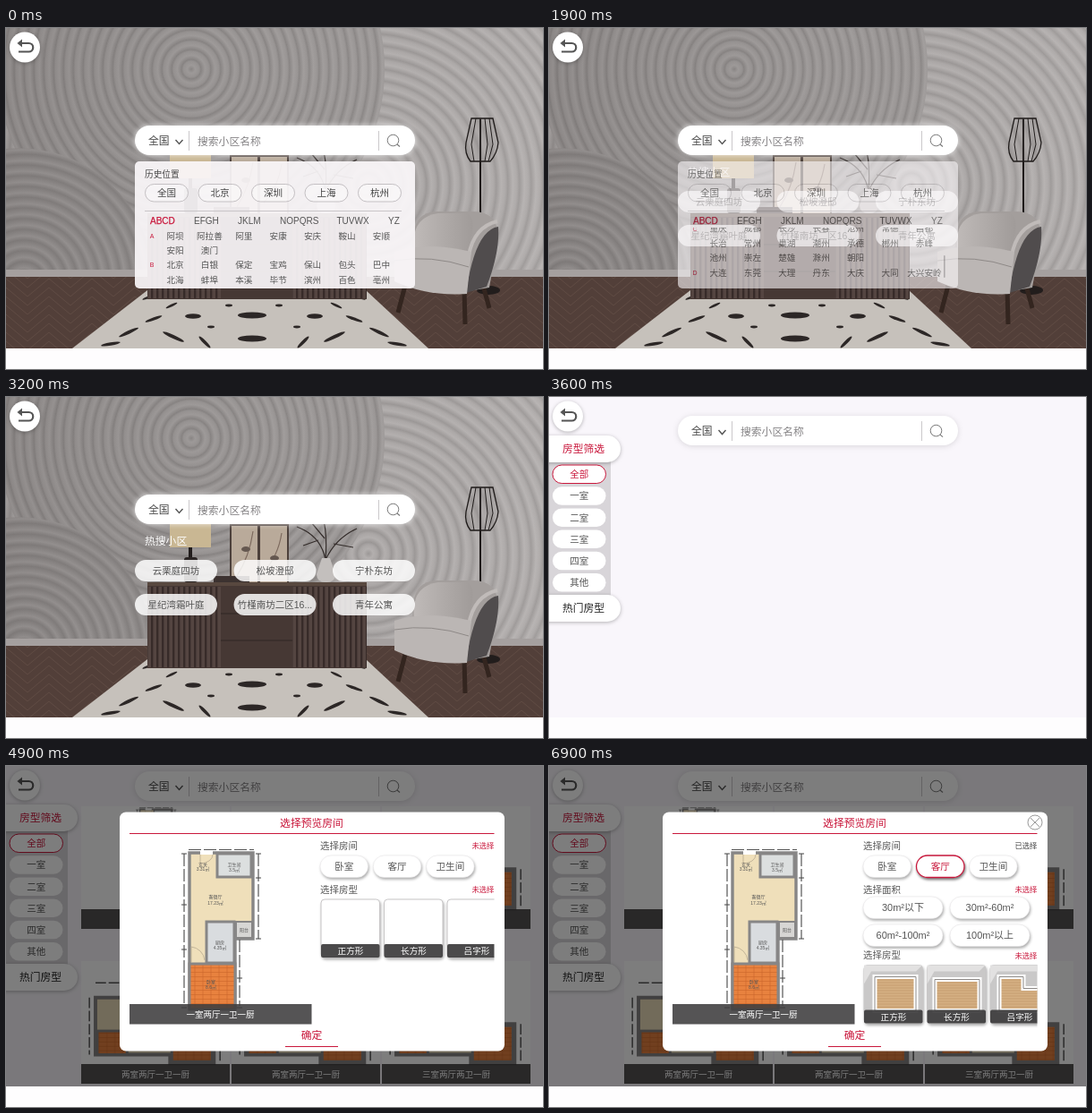
Animation of 600 by 381 pixels, one loop 7000 ms. Source, as an HTML page:

```html
<!DOCTYPE html>
<html lang="zh">
<head>
<meta charset="utf-8">
<style>
  html, body { margin: 0; width: 100%; height: 100%; overflow: hidden; background: #fefdfe; }
  svg { display: block; width: 100%; height: 100%; }
  text { font-family: "Liberation Sans", "Noto Sans CJK SC", "Noto Sans CJK", sans-serif; }
  .soft { filter: drop-shadow(0 1px 2px rgba(0,0,0,.28)); }
  .lift { filter: drop-shadow(1px 2px 1.5px rgba(0,0,0,.32)); }
</style>
</head>
<body>
<svg id="stage" viewBox="0 0 600 381">
  <defs>
    <radialGradient id="ringA" gradientUnits="userSpaceOnUse" cx="207" cy="46" r="11" spreadMethod="repeat">
      <stop offset="0" stop-color="#8d8988"/><stop offset=".4" stop-color="#a39f9e"/>
      <stop offset=".8" stop-color="#9b9796"/><stop offset="1" stop-color="#8a8685"/>
    </radialGradient>
    <radialGradient id="ringB" gradientUnits="userSpaceOnUse" cx="405" cy="175" r="13" spreadMethod="repeat">
      <stop offset="0" stop-color="#9c9897"/><stop offset=".4" stop-color="#b4b0af"/>
      <stop offset=".75" stop-color="#aba7a6"/><stop offset="1" stop-color="#9a9695"/>
    </radialGradient>
    <radialGradient id="ringC" gradientUnits="userSpaceOnUse" cx="20" cy="285" r="12" spreadMethod="repeat">
      <stop offset="0" stop-color="#8a8685"/><stop offset=".4" stop-color="#a09c9b"/><stop offset="1" stop-color="#8a8685"/>
    </radialGradient>
    <linearGradient id="shade">
      <stop offset="0" stop-color="#3a3433" stop-opacity=".16"/><stop offset=".5" stop-color="#555" stop-opacity=".03"/>
      <stop offset="1" stop-color="#fff" stop-opacity=".06"/>
    </linearGradient>
    <linearGradient id="seat"><stop offset="0" stop-color="#bfbab8"/><stop offset="1" stop-color="#a09b99"/></linearGradient>
    <pattern id="parquet" width="48" height="20" patternUnits="userSpaceOnUse">
      <rect width="48" height="20" fill="#523f39"/>
      <path d="M0 0L24 20L48 0M0 10L12 20M48 10L36 20M12 0L24 10L36 0" fill="none" stroke="#5f4b43"/>
    </pattern>
    <pattern id="slats" width="6" height="8" patternUnits="userSpaceOnUse">
      <rect width="6" height="8" fill="#544541"/><rect width="2.4" height="8" fill="#372b29"/>
    </pattern>
    <pattern id="wood" width="8" height="3" patternUnits="userSpaceOnUse">
      <rect width="8" height="3" fill="#d5b083"/><path d="M0 .5H8" stroke="#b98f5f" stroke-width=".6"/>
    </pattern>
    <pattern id="boards" width="9" height="5" patternUnits="userSpaceOnUse">
      <rect width="9" height="5" fill="#e8823f"/><path d="M0 .5H9M4 0V5" stroke="#c9652a" stroke-width=".6"/>
    </pattern>
    <clipPath id="photoClip"><rect width="600" height="358"/></clipPath>
    <clipPath id="listClip"><rect x="150" y="223" width="300" height="64"/></clipPath>
    <clipPath id="roomClip"><rect x="346" y="75" width="199.5" height="220"/></clipPath>
  </defs>
</svg>
<script>
const stage = document.getElementById('stage');
const RED = '#c9183c', DARK = '#444';

function add(parent, tag, attrs = {}, content) {
  const node = document.createElementNS('http://www.w3.org/2000/svg', tag);
  for (const key in attrs) node.setAttribute(key, attrs[key]);
  if (content) node.textContent = content;
  parent.appendChild(node);
  return node;
}
const group = (parent, attrs) => add(parent, 'g', attrs);
const box = (parent, x, y, width, height, fill, extra) =>
  add(parent, 'rect', { x, y, width, height, fill, ...extra });
const path = (parent, d, stroke, width = 1, fill = 'none') =>
  add(parent, 'path', { d, stroke, 'stroke-width': width, fill });
const oval = (parent, cx, cy, rx, ry, fill, extra) =>
  add(parent, 'ellipse', { cx, cy, rx, ry, fill, ...extra });
// Text is placed by its vertical middle.
const label = (parent, x, y, size, fill, content, anchor = 'middle') =>
  add(parent, 'text', { x, y: y + size * .37, 'font-size': size, fill, 'text-anchor': anchor }, content);
function pill(parent, x, y, w, h, content, size, color = '#555', extra = {}) {
  box(parent, x, y, w, h, '#fff', { rx: h / 2, ...extra });
  label(parent, x + w / 2, y + h / 2, size, color, content);
}

// Living room
const room = group(stage, { 'clip-path': 'url(#photoClip)' });
box(room, 0, 0, 600, 358, 'url(#ringB)');
oval(room, 207, 46, 216, 216, 'url(#ringA)');
path(room, 'M0 135A150 150 0 0 1 165 285H0Z', 'none', 0, 'url(#ringC)');
box(room, 0, 0, 600, 358, 'url(#shade)');
box(room, 0, 270, 600, 8, '#a5a09f');
box(room, 0, 278, 600, 80, 'url(#parquet)');
path(room, 'M158 293H402L472 358H74Z', 'none', 0, '#c6c1bb');
for (const side of [-1, 1]) {
  const rug = group(room, { transform: `translate(277 0) scale(${side} 1)` });
  for (const [x, y, rx, ry, turn] of [
    [68, 322, 9, 2.8, 0], [28, 310, 4, 1.4, 0], [48, 334, 4, 1.4, 0], [92, 310, 7, 1.4, 25],
    [112, 325, 10, 1.6, 20], [90, 345, 13, 2, -25], [140, 340, 12, 1.8, 25], [55, 351, 9, 1.8, -45],
    [160, 353, 11, 1.8, 10], [118, 301, 7, 1.4, 20]
  ]) oval(rug, x, y, rx, ry, '#2c2726', { transform: `rotate(${turn} ${x} ${y})` });
}
oval(room, 275, 321, 16, 3.4, '#2c2726');
oval(room, 275, 347, 16, 3.6, '#2c2726');

// Pictures, table lamp, vase and cabinet
box(room, 250, 142, 66, 66, '#4c403b');
box(room, 252, 144, 29, 63, '#b9aa9a');
box(room, 284, 144, 30, 63, '#b9aa9a');
path(room, 'M258 200Q272 178 276 150M288 195Q304 178 308 152', '#7d6a5e', 1.2);
oval(room, 268, 170, 5, 3, '#655850');
oval(room, 300, 180, 5, 3, '#655850');
path(room, 'M183 142H229V168H183Z', 'none', 0, '#c9b793');
path(room, 'M206 168V180', '#211c1b', 4);
box(room, 199, 179, 15, 28, '#2b2524', { rx: 3 });
box(room, 232, 200, 40, 7, '#3c3230');
path(room, 'M357 182Q352 155 325 145M357 182Q359 155 355 138M357 182Q368 158 392 147M349 160L332 166M366 164L388 168M356 158L341 140',
  '#332c2a', 1.2);
path(room, 'M353 180H362L368 198Q368 207 358 207Q347 207 347 198Z', 'none', 0, '#c3bfbd');
box(room, 158, 207, 245, 96, '#463834');
box(room, 158, 212, 82, 90, 'url(#slats)');
box(room, 320, 212, 83, 90, 'url(#slats)');
box(room, 158, 207, 245, 4, '#58483f');
path(room, 'M240 242H320M240 272H320', '#2f2624');

// Floor lamp and armchair
path(room, 'M530 102V290', '#1f1b1a', 2);
oval(room, 539, 293, 13, 5, '#221d1c');
path(room, 'M520 101H544L550 128Q549 140 541 149H519Q512 140 514 128Z', '#1f1b1a', 1.3, '#8d878530');
path(room, 'M525 101L520 130L523 149M530 101V149M535 101L538 130L535 149M540 101L544 130L539 149', '#1f1b1a');
path(room, 'M448 280L438 318M512 292L513 331M532 284L540 313', '#33251f', 5);
path(room, 'M455 252Q450 205 482 205H522Q550 205 550 235L540 290L500 297Z', 'none', 0, '#a39e9c');
path(room, 'M456 248Q452 211 483 207H514Q528 212 516 247Z', 'none', 0, 'url(#seat)');
path(room, 'M550 222Q524 226 514 296L537 289Q552 250 550 222Z', 'none', 0, '#504c4d');
path(room, 'M517 254Q523 222 549 216', '#c0bbb9', 4);
path(room, 'M434 250Q470 238 520 250L515 297Q470 300 434 283Z', 'none', 0, '#bbb6b4');
path(room, 'M434 260Q475 253 517 267', '#8e8987');

// Popular neighbourhoods
const hot = group(stage);
label(hot, 155, 161, 11.8, '#fff', '热搜小区', 'start');
['云栗庭四坊', '松坡澄邸', '宁朴东坊', '星纪湾霜叶庭', '竹槿南坊二区16...', '青年公寓'].forEach((name, i) =>
  pill(hot, 144 + i % 3 * 110.5, 182 + Math.floor(i / 3) * 38, 92, 24, name, 10.5, '#555', { 'fill-opacity': .84 }));

// City chooser
const chooser = group(stage);
box(chooser, 144, 149, 313, 142, '#fbf8fa', { rx: 5, 'fill-opacity': .92 });
label(chooser, 155, 163, 9.7, DARK, '历史位置', 'start');
['全国', '北京', '深圳', '上海', '杭州'].forEach((city, i) =>
  pill(chooser, 155.5 + i * 59.5, 174.5, 48, 19.5, city, 10.6, DARK, { 'fill-opacity': .3, stroke: '#c4c0c3' }));
path(chooser, 'M155 204.5H442', '#c9c5c8');
[['ABCD', 161], ['EFGH', 210], ['JKLM', 259], ['NOPQRS', 306], ['TUVWX', 369.5], ['YZ', 427]].forEach(([tab, x], i) => {
  const node = label(chooser, x, 215, 10, i ? '#555' : RED, tab, 'start');
  if (!i) { node.setAttribute('stroke', RED); node.setAttribute('stroke-width', .25); }
});
const cities = group(group(chooser, { 'clip-path': 'url(#listClip)' }));
[
  'A 阿坝 阿拉善 阿里 安康 安庆 鞍山 安顺', '- 安阳 澳门',
  'B 北京 白银 保定 宝鸡 保山 包头 巴中', '- 北海 蚌埠 本溪 毕节 滨州 百色 亳州', '- 白山 白城',
  'C 重庆 成都 长沙 长春 沧州 常德 昌都', '- 长治 常州 巢湖 潮州 承德 郴州 赤峰', '- 池州 崇左 楚雄 滁州 朝阳',
  'D 大连 东莞 大理 丹东 大庆 大同 大兴安岭'
].forEach((line, row) => {
  const [letter, ...names] = line.split(' '), y = 232 + row * 16.35;
  if (letter !== '-') label(cities, 163, y, 7, RED, letter);
  names.forEach((name, i) => label(cities, 189 + i * 38.4, y, 9.6, '#555', name));
});
const scrollbar = box(chooser, 441, 228, 1.6, 25, '#a9a6a8', { rx: .8 });

// Layout list page
const listPage = group(stage);
box(listPage, 0, 0, 600, 358, '#f9f6fb');

function plan(parent, x, y, scale) {
  const g = group(parent, { transform: `translate(${x} ${y}) scale(${scale})` });
  path(g, 'M0 10H45V0H100V40H135V85H85V75H0Z', '#858383', 4, '#eadcb9');
  box(g, 45, 2, 28, 28, '#d8dadb', { stroke: '#858383', 'stroke-width': 3 });
  box(g, 2, 48, 34, 27, 'url(#boards)', { stroke: '#858383', 'stroke-width': 3 });
  box(g, 87, 42, 46, 41, 'url(#boards)', { stroke: '#858383', 'stroke-width': 3 });
  path(g, 'M-7 10V75M0 -7H100M142 40V85', '#555', 1.5).setAttribute('stroke-dasharray', '12 3');
}
const ONE_ROOM = '一室两厅一卫一厨', TWO_ROOMS = '两室两厅一卫一厨', THREE_ROOMS = '三室两厅两卫一厨';
const cards = [ONE_ROOM, TWO_ROOMS, THREE_ROOMS, TWO_ROOMS, TWO_ROOMS, THREE_ROOMS].map((name, i) => {
  const x = 84 + i % 3 * 168, y = i < 3 ? 45 : 218;
  const card = group(listPage);
  box(card, x, y, 166, 137, '#fff');
  if (i === 0) apartment(group(card, { transform: 'translate(45 -1) scale(.51)' }));
  else plan(card, x + 16, y + 31, .98);
  box(card, x, y + 115, 166, 22, '#3c3a3b', { 'fill-opacity': .88 });
  label(card, x + 83, y + 126, 9.5, '#fff', name);
  return card;
});

function sideTab(y, name, color) {
  box(listPage, -20, y, 100, 30, '#fff', { rx: 15, class: 'soft' });
  label(listPage, 38.5, y + 15, 11.8, color, name);
}
box(listPage, 0, 65, 69, 165, '#d8d5d9');
sideTab(43, '房型筛选', RED);
sideTab(221, '热门房型', '#222');
['全部', '一室', '二室', '三室', '四室', '其他'].forEach((name, i) =>
  pill(listPage, 4, 76 + i * 24.2, 59.5, 20.5, name, 10.5, i ? '#555' : RED, i ? {} : { stroke: RED }));

// Search bar and back button
const search = group(stage);
const searchBack = box(search, 144, 109, 313, 33, '#fff', { rx: 16.5 });
label(search, 159, 126, 11.8, DARK, '全国', 'start');
path(search, 'M189.5 125L193.5 129.5L197.5 125', '#555', 1.4);
path(search, 'M204.5 115V137M416.5 115V137', '#cbc8cb');
label(search, 214, 127, 11.8, '#858385', '搜索小区名称', 'start');
oval(search, 432.5, 125.5, 6.3, 6.3, 'none', { stroke: '#777' });
path(search, 'M437 130L440 132.5', '#777', 1.1);

const back = group(stage);
oval(back, 21, 21.5, 17, 17, '#fff', { class: 'soft' });
path(back, 'M15 17H25.5A4.7 4.7 0 0 1 25.5 26.5H14', '#555', 2.2);
path(back, 'M18 12.5L12.5 17L18 21.5Z', 'none', 0, '#555');

// Room dialog
const shadeLayer = box(stage, 0, 0, 600, 358, '#000', { 'fill-opacity': .51 });
const dialog = group(stage);
box(dialog, 127, 51.5, 430, 267, '#fff', { rx: 7 });
label(dialog, 341.5, 63.5, 11.8, RED, '选择预览房间');
path(dialog, 'M138 75.5H545.5', RED);
label(dialog, 341.5, 300.5, 11.8, RED, '确定');
path(dialog, 'M312 313.5H371', RED);

function apartment(parent) {
  const wall = { stroke: '#878686', 'stroke-width': 3 };
  path(parent, 'M205 97H276V193H256V270H205Z', '#878686', 3.4, '#efdfba');
  box(parent, 236, 98, 38, 26, '#dcdfdf', wall);
  box(parent, 257, 174, 18, 18, '#d7d6d4', { stroke: '#878686', 'stroke-width': 2 });
  box(parent, 224, 174, 31, 46, '#d9dcdf', wall);
  box(parent, 205, 221, 51, 51, 'url(#boards)', wall);
  box(parent, 217, 94, 14, 5, '#fff');
  path(parent, 'M217 99V109A14 10 0 0 0 231 99M207 219V202A17 17 0 0 1 222 217', '#b8aa91', .8);
  path(parent, 'M204 93.5H277M199 98V268M282 98V193M261 194V268', '#555', 1.2).setAttribute('stroke-dasharray', '14 3');
  path(parent, 'M196 98H202M196 155H202M196 205H202M196 270H202M279 98H285M279 125H285M279 193H285M258 237H264M258 270H264', '#444');
  [['玄关', 220, 110], ['3.31㎡', 220, 115], ['卫生间', 255, 110], ['3.5㎡', 255, 116], ['客餐厅', 234, 146], ['17.23㎡', 234, 153],
   ['厨房', 239, 197], ['4.35㎡', 239, 203], ['卧室', 229, 241], ['8.6㎡', 229, 247], ['阳台', 266, 183]]
    .forEach(([name, x, y]) => label(parent, x, y, 5, '#555', name));
}
apartment(dialog);
box(dialog, 138, 266, 203.5, 22.5, '#3e3d3e', { 'fill-opacity': .88 });
label(dialog, 239.5, 277, 9.5, '#fff', ONE_ROOM);

const closeButton = group(dialog);
oval(closeButton, 543, 63, 8, 8, '#fff', { stroke: '#999' });
path(closeButton, 'M538 58L548 68M548 58L538 68', '#999');

const options = group(dialog, { 'clip-path': 'url(#roomClip)' });
function heading(parent, y, name, state = '未选择', color = RED) {
  label(parent, 351, y, 10.5, '#555', name, 'start');
  return label(parent, 545.5, y, 8.4, color, state, 'end');
}
const roomState = heading(options, 89, '选择房间');
const plainPill = { class: 'lift', stroke: '#e6e4e6', 'stroke-width': .6 };
['卧室', '客厅', '卫生间'].forEach((name, i) =>
  pill(options, 351 + i * 59.3, 100, 53.5, 24.5, name, 10.6, '#555', plainPill));
const chosen = group(options);
pill(chosen, 410.5, 100, 53.5, 24.5, '客厅', 10.6, RED, { class: 'lift', stroke: RED, 'stroke-width': 1.3 });
heading(chosen, 138, '选择面积');
['30m²以下', '30m²-60m²', '60m²-100m²', '100m²以上'].forEach((name, i) =>
  pill(chosen, 351 + i % 2 * 97, 146 + Math.floor(i / 2) * 31, 89, 24.5, name, 11, '#555', plainPill));

const shapes = group(options);
heading(shapes, 138, '选择房型');
const tileArt = [
  'M364 162H410V200H364Z', 'M431 165H481V200H431Z', 'M503 162H530V175H550V200H503Z'
].map((outline, i) => {
  const x = 352 + i * 70.5;
  box(shapes, x, 149, 65.5, 65, '#fff', { rx: 4, stroke: '#c8c6c7', class: 'lift' });
  const art = group(shapes);
  box(art, x, 149, 65.5, 65, '#c9c8c8', { rx: 4 });
  path(art, `M${x} 149H${x + 65}L${x + 58} 156H${x + 8}L${x} 170Z`, 'none', 0, '#e2e1e1');
  path(art, outline, '#fff', 5, 'url(#wood)');
  path(art, outline, '#8d8a88', 1);
  box(shapes, x, 199, 65.5, 15, '#3e3d3e', { rx: 2, 'fill-opacity': .93 });
  label(shapes, x + 33, 206.5, 9.6, '#fff', ['正方形', '长方形', '吕字形'][i]);
  return art;
});

const LOOP = 7000, STEP = 100;
const ramp = (t, from, to) => Math.min(1, Math.max(0, (t - from) / (to - from)));
const smooth = (t, from, to) => (1 - Math.cos(Math.PI * ramp(t, from, to))) / 2;
function fade(node, opacity) {
  node.setAttribute('opacity', opacity);
  node.style.display = opacity > 0 ? '' : 'none';
}
const moveY = (node, y) => node.setAttribute('transform', `translate(0 ${y})`);

function render(t) {
  const scroll = smooth(t, 0, 800);
  moveY(cities, -89.8 * scroll);
  moveY(scrollbar, 26 * scroll);
  fade(scrollbar, t >= 100 ? 1 : 0);
  fade(chooser, 1 - smooth(t, 1700, 2200));
  fade(hot, ramp(t, 1700, 1950));

  const onList = t >= 3300;
  fade(listPage, ramp(t, 3200, 3500));
  moveY(search, -103 * smooth(t, 3300, 3700));
  searchBack.style.filter = onList
    ? 'drop-shadow(0 1px 3px rgba(0,0,0,.13))' : 'drop-shadow(0 0 3px rgba(255,255,255,.75))';
  cards.forEach((card, i) => fade(card, ramp(t, 4000 + i * 40, 4250 + i * 50)));

  fade(shadeLayer, ramp(t, 4600, 4850));
  fade(dialog, ramp(t, 4600, 4850));
  fade(closeButton, t >= 5000 ? 1 : 0);
  tileArt.forEach((art, i) => fade(art, t >= 5000 + i * 100 ? 1 : 0));

  const picked = t >= 6900;
  fade(chosen, picked ? 1 : 0);
  moveY(shapes, picked ? 73.5 : 0);
  roomState.textContent = picked ? '已选择' : '未选择';
  roomState.setAttribute('fill', picked ? DARK : RED);
}

const start = performance.now();
function tick() {
  const elapsed = (performance.now() - start) % LOOP;
  render(Math.floor(elapsed / STEP) * STEP);
  requestAnimationFrame(tick);
}
tick();
</script>
</body>
</html>
```
